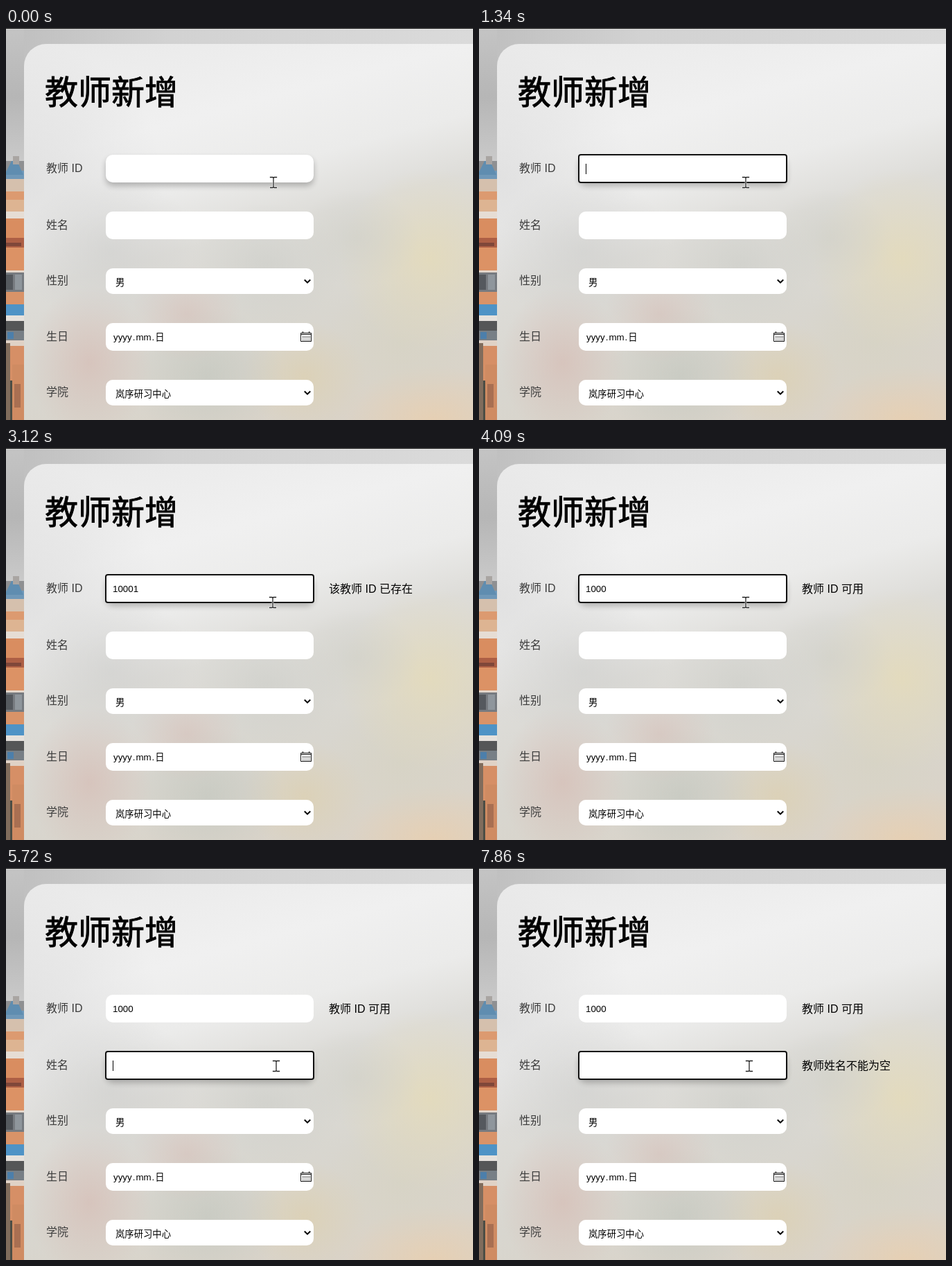
Write an HTML page that moves like this. It is 674 px wide and 566 px high and loops after 8 s.

```html
<!DOCTYPE html>
<html lang="zh-CN">
<head>
<meta charset="utf-8">
<title>教师新增</title>
<style>
html, body { margin: 0; width: 100%; height: 100%; overflow: hidden; }
body {
  position: relative;
  background: linear-gradient(90deg, #bebebe, #d2d2d2 35%, #dadada);
}
svg { position: absolute; left: 0; top: 0; }
#card {
  position: absolute; left: 26px; top: 23px; right: 0; bottom: 0;
  border-radius: 32px 0 0 0;
  background:
    radial-gradient(130px 110px at 125px 300px, #cfcfcda0, #cfcfcd00),
    radial-gradient(200px 190px at 0 190px, #d9d9d9a0, #d9d9d900),
    radial-gradient(90px 110px at 95px 460px, #d6bcb4b0, #d6bcb400),
    radial-gradient(80px 70px at 235px 390px, #d6c1baa0, #d6c1ba00),
    radial-gradient(110px 100px at 265px 480px, #c3c7bfb0, #c3c7bf00),
    radial-gradient(110px 90px at 350px 320px, #cdcec9a0, #cdcec900),
    radial-gradient(90px 70px at 480px 280px, #d0d0c8a0, #d0d0c800),
    radial-gradient(130px 130px at 585px 310px, #e5dbb9d0, #e5dbb900),
    radial-gradient(90px 80px at 405px 480px, #ddd0afb0, #ddd0af00),
    radial-gradient(110px 90px at 545px 430px, #d6d3c2a0, #d6d3c200),
    radial-gradient(130px 80px at 590px 545px, #e9cfafd0, #e9cfaf00),
    linear-gradient(165deg, #e9e9e9 0, #f0f0f0 24%, #ebebea 38%, #dddcd8 50%, #d8d6cf 70%, #dad2c6 100%);
}
text { font: 16px "Liberation Sans", "Noto Sans CJK SC", "Noto Sans CJK", sans-serif; }
.label { fill: #3c3c3c; font-weight: 300; }
.value { font-size: 13.333px; }
.title { font-size: 48px; stroke: #000; stroke-width: .9px; }
.field { fill: #fff; }
</style>
</head>
<body>
<svg id="photo" width="26" height="566">
  <defs>
    <linearGradient id="sky" x2="0" y2="1">
      <stop stop-color="#c4c4c4"/><stop offset=".5" stop-color="#b6b6b6"/><stop offset="1" stop-color="#cbcbcb"/>
    </linearGradient>
  </defs>
  <rect width="34" height="200" fill="url(#sky)"/>
</svg>
<div id="card"></div>
<svg id="form" width="674" height="566">
  <rect width="674" height="1" fill="#0c0c0c"/>
  <text class="title" x="56" y="110">教师新增</text>
  <g id="rows"></g>
  <rect id="focus" x="144" width="300" height="40" rx="3" fill="#fff" stroke="#111" stroke-width="2"/>
  <text class="value" x="154" y="208" id="typed"></text>
  <text x="466" y="209" id="idNote"></text>
  <text x="466" y="291" id="nameNote">教师姓名不能为空</text>
  <rect id="caret" width="1" height="15"/>
  <text class="value" x="158" y="372">男</text>
  <text class="value" x="158" y="533">岚序研习中心</text>
  <text class="value" y="451"><tspan x="155">yyyy</tspan><tspan x="182.7">.</tspan><tspan x="187.4">mm</tspan><tspan x="210.6">.</tspan><tspan x="215.3">日</tspan></text>
  <g fill="none" stroke="#000" stroke-width="2">
    <path d="M430.8 363.5l4.2 4.2 4.2-4.2M430.8 524.5l4.2 4.2 4.2-4.2"/>
  </g>
  <g fill="none" stroke="#111">
    <path d="M425.5 440.5h15v12h-15zM426 442.5h14M428.5 438v3M437.5 438v3"/>
    <path d="M428 445.5h11M428 447.5h11M428 450.5h11" stroke-dasharray="1 1"/>
  </g>
  <g id="beam" fill="none" stroke-linecap="square">
    <path id="beamShape" d="M-4.5-7.5h3.5l1 1 1-1h3.500M0-6v12M-4.500 7.500h3.500l1-1 1 1h3.500" stroke="#fff" stroke-opacity=".7" stroke-width="2.500"/>
    <use href="#beamShape"/>
    <path d="M-4.500-7.500h3.500l1 1 1-1h3.500M0-6v12M-4.500 7.500h3.500l1-1 1 1h3.500" stroke="#222" stroke-width="1.300"/>
  </g>
  <path id="arrow" d="M0 0v15l3.400-3.200 2.700 6.200 2.700-1.200-2.700-6h4.700z" stroke="#fff" stroke-width=".8"/>
</svg>
<script>
const LOOP = 8000, ID_Y = 183, NAME_Y = 265, DIGIT = 7.41;
const $ = id => document.getElementById(id);

function add(parent, tag, attrs, text = '') {
  const el = document.createElementNS('http://www.w3.org/2000/svg', tag);
  for (const key in attrs) el.setAttribute(key, attrs[key]);
  el.textContent = text;
  parent.append(el);
  return el;
}

// Building bands: top, height, colour
[
  [192, 14, '#8f9092'], [206, 12, '#6f98b8'], [218, 18, '#d5c0ad'],
  [236, 12, '#dc9a70'], [248, 17, '#ddb492'], [265, 10, '#e6ddd4'],
  [275, 28, '#d98d60'], [303, 14, '#ad5f45'], [317, 33, '#dc9265'],
  [350, 3, '#e4d6ca'], [353, 28, '#777b80'], [381, 18, '#d99368'],
  [399, 16, '#4f93c6'], [415, 8, '#e5e1dc'], [423, 14, '#555657'],
  [437, 14, '#777f86'], [451, 8, '#e0d2c6'], [459, 50, '#d68f66'],
  [509, 57, '#4c4d45']
].forEach(([y, height, fill]) => add($('photo'), 'rect', { y, width: 26, height, fill }));
[
  'M0 208l8-16h8l9 20H0z#5f8db0', 'M10 185h9v12h-9z#a9a5a2',
  'M0 356h10v22H0z#55595e', 'M13 356h10v22H13z#8f969c',
  'M0 310h22v5H0z#7f473a', 'M2 439h9v10H2z#4c7fab',
  'M9 486h17v80H9z#cf8b62', 'M0 455h6v111H0z#806c5c', 'M12 514h9v34H12z#a86f52'
].forEach(s => {
  const [d, hex] = s.split('#');
  add($('photo'), 'path', { d, fill: '#' + hex });
});

const shadows = {};
[
  ['教师 ID', 208, ID_Y, 40], ['姓名', 290, NAME_Y, 40], ['性别', 370, 347, 37],
  ['生日', 451, 426, 40], ['学院', 531, 508, 37]
].forEach(([label, base, y, height]) => {
  add($('rows'), 'text', { x: 58, y: base, class: 'label' }, label);
  const box = { x: 144, width: 300, height, rx: 10 };
  shadows[y] = add($('rows'), 'rect', { ...box, y: y + 5, fill: '#000', style: 'filter:blur(4px)' });
  add($('rows'), 'rect', { ...box, y, class: 'field' });
});

// Each step holds from its time until the next one
const typing = [[0, ''], [1460, '1'], [1700, '10'], [1950, '100'], [2190, '1000'], [2710, '10001'], [3900, '1000']];
const idNotes = [[0, ''], [2880, '该教师 ID 已存在'], [4050, '教师 ID 可用']];
const focusY = [[0, 0], [320, ID_Y], [5700, NAME_Y]];
const blink = [
  [0, 0], [320, 1], [610, 0], [1010, 1], [1410, 0], [1460, 1], [2590, 0], [2710, 1],
  [3120, 0], [3530, 1], [3930, 0], [4340, 1], [4740, 0], [5140, 1], [5510, 0],
  [5700, 1], [6120, 0], [6530, 1], [6930, 0], [7340, 1], [7740, 0]
];
const path = [[0, 386, 223], [40, 386, 223], [80, 385, 223], [4740, 385, 223], [4880, 379, 248], [5030, 376, 268], [5310, 390, 286], [LOOP, 390, 286]];

const at = (steps, t) => steps.findLast(s => s[0] <= t)[1];
const clamp = v => Math.max(0, Math.min(1, v));
const show = (el, on) => el.setAttribute('visibility', on ? 'visible' : 'hidden');

function pointer(t) {
  const i = path.findIndex(p => p[0] > t);
  const [t0, x0, y0] = path[i - 1], [t1, x1, y1] = path[i];
  const k = (t - t0) / (t1 - t0);
  return [x0 + (x1 - x0) * k, y0 + (y1 - y0) * k];
}

function render(t) {
  const text = at(typing, t), fy = at(focusY, t);
  $('typed').textContent = text;
  $('idNote').textContent = at(idNotes, t);
  show($('nameNote'), t >= 5920);

  show($('focus'), fy);
  $('focus').setAttribute('y', fy);
  show($('caret'), at(blink, t));
  $('caret').setAttribute('x', fy === ID_Y ? Math.round(154 + DIGIT * text.length) : 154);
  $('caret').setAttribute('y', fy + 13);

  for (const y in shadows) shadows[y].setAttribute('opacity', 0);
  shadows[ID_Y].setAttribute('opacity', .24 * clamp((4920 - t) / 150));
  shadows[NAME_Y].setAttribute('opacity', .24 * clamp((t - 5070) / 150));

  const move = `translate(${pointer(t).map(Math.round)})`;
  const isArrow = t > 4760 && t < 5075;
  for (const id of ['beam', 'arrow']) {
    $(id).setAttribute('transform', move);
    show($(id), (id === 'arrow') === isArrow);
  }
}

const start = performance.now();
function tick() {
  render((performance.now() - start) % LOOP);
  requestAnimationFrame(tick);
}
tick();
</script>
</body>
</html>
```
